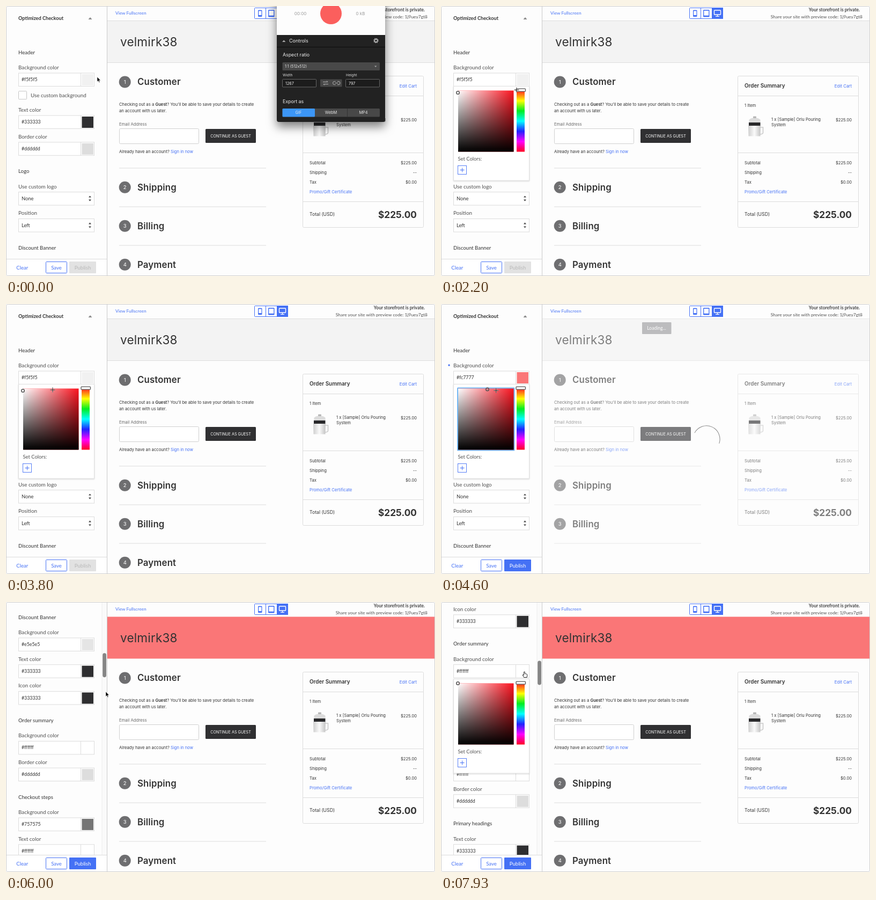
An HTML page for the animation above (8 s loop, 800 by 503 pixels).

```html
<!DOCTYPE html>
<html lang="en">
<head>
<meta charset="utf-8">
<title>Checkout theme editor</title>
<style>
html, body { margin: 0; width: 100%; height: 100%; overflow: hidden; background: #fdfdfd; }
svg { display: block; width: 800px; height: 503px; }
text { white-space: pre; }
.panel { font-family: Lato, sans-serif; }
.page { font-family: Inter, sans-serif; }
</style>
</head>
<body>
<svg id="stage" viewBox="0 0 800 503"></svg>
<script>
const LOOP = 8000;
const BLUE = '#4571f5', INK = '#333', LABEL = '#505050', LINE = '#dcdcdc', PAPER = '#fdfdfd';

// Markup helpers; text is placed by its vertical centre.
const text = (x, y, size, str, fill = INK, attrs = '') =>
  `<text x="${x}" y="${y + size * 0.35}" font-size="${size}" fill="${fill}" ${attrs}>${str}</text>`;
const rect = (x, y, w, h, fill, attrs = '') =>
  `<rect x="${x}" y="${y}" width="${w}" height="${h}" fill="${fill}" ${attrs}/>`;
const path = (d, stroke, attrs = '') => `<path d="${d}" fill="none" stroke="${stroke}" ${attrs}/>`;
const MIDDLE = 'text-anchor="middle"', END = 'text-anchor="end"';

const gradient = (id, stops, vertical) =>
  `<linearGradient id="${id}" x2="${vertical ? 0 : 1}" y2="${vertical ? 1 : 0}">` +
  stops.map(([color, alpha = 1], i) =>
    `<stop offset="${i / (stops.length - 1)}" stop-color="${color}" stop-opacity="${alpha}"/>`).join('') +
  '</linearGradient>';

const defs = `<defs>
  ${gradient('tint', [['#fff'], ['#fff', 0]])}
  ${gradient('shade', [['#000', 0], ['#000']], true)}
  ${gradient('hue', ['#f22', '#ff0', '#0e2', '#0ff', '#22f', '#f0f', '#f02'].map(c => [c]), true)}
  ${gradient('pot', [['#cfcfcf'], ['#fafafa'], ['#c4c4c4']])}
  <filter id="soft" x="-20%" y="-20%" width="140%" height="150%">
    <feDropShadow dx="0" dy="9" stdDeviation="9" flood-opacity=".5"/></filter>
  <filter id="lift"><feDropShadow dx="0" dy="1" stdDeviation="1.2" flood-opacity=".18"/></filter>
</defs>`;

// Sidebar
const SECTIONS = [
  ['Header', [['Background color', '#f5f5f5', true], ['Text color', '#333333'], ['Border color', '#dddddd']]],
  ['Logo', [['Use custom logo', 'None'], ['Position', 'Left']]],
  ['Discount Banner', [['Background color', '#e5e5e5'], ['Text color', '#333333'], ['Icon color', '#333333']]],
  ['Order summary', [['Background color', '#ffffff'], ['Border color', '#dddddd']]],
  ['Checkout steps', [['Background color', '#757575'], ['Text color', '#ffffff'], ['Border color', '#dddddd']]],
  ['Primary headings', [['Text color', '#333333']]],
];

function field(y, value) {
  const box = rect(23.5, y - 12, 141, 24.5, '#fff', `stroke="${LINE}"`);
  if (value[0] !== '#') {
    return box + text(29, y, 9.4, value) +
      `<path d="M154 ${y - 2}l2.5-3.2 2.5 3.2zM154 ${y + 2}l2.5 3.2 2.5-3.2z" fill="#444"/>`;
  }
  const shown = value === '#333333' ? '#2e2e30' : value;
  return box + path(`M139.5 ${y - 12}v24.5`, LINE) +
    text(29, y, 8.8, value, INK, 'class="value"') +
    rect(141.5, y - 10, 21.5, 21, shown, 'class="swatch"');
}

function sidebarContent() {
  let out = text(23, 23, 9.2, 'Optimized Checkout', INK, 'font-weight="700"') +
    '<path d="M153.5 25l3.5-4 3.5 4z" fill="#888"/>';
  let y = 43.5;
  for (const [title, fields] of SECTIONS) {
    y += 43;
    out += text(23, y, 9.6, title);
    y += 0.7;
    for (const [label, value, hasCheckbox] of fields) {
      y += 27.3;
      out += text(23, y, 9.85, label, LABEL);
      y += 22.5;
      out += field(y, value);
      if (hasCheckbox) {
        y += 29.2;
        out += rect(23.5, y - 7.5, 15, 15, '#fff', 'stroke="#c4c4c4" rx="1"') +
          text(46, y + 0.5, 9.85, 'Use custom background', LABEL);
      }
    }
    y -= 0.7;
  }
  return out;
}

// Origin is the vertical centre of the field the picker belongs to.
const picker = `<g id="picker">
  ${rect(23.5, 13, 141, 175.5, '#fff', `stroke="#e0e0e0" filter="url(#lift)"`)}
  ${rect(30, 19, 107.5, 118, '#74b8f4', 'id="focusRing" rx="1.5"')}
  ${['#fb1420', 'url(#tint)', 'url(#shade)'].map(f => rect(32, 21, 103.5, 114, f)).join('')}
  ${rect(141, 21, 15, 114, 'url(#hue)')}
  ${rect(140, 17.7, 17.5, 5, '#fff', 'stroke="#555" stroke-width="1.3" rx="1"')}
  <circle id="knob" r="2.8" fill="none" stroke="#555" stroke-width="1.5"/>
  ${text(31.5, 148.5, 9.4, 'Set Colors:', LABEL)}
  ${rect(31.5, 161, 16, 16, '#fff', `stroke="${BLUE}" stroke-width=".9"`)}
  ${path('M35.5 169h8M39.5 165v8', BLUE)}
</g>`;

const sidebar = `<g class="panel">
  ${rect(0, 0, 189, 503, PAPER)}
  <g id="scroller">${sidebarContent()}
    <circle id="changed" cx="15" cy="114" r="1.7" fill="${BLUE}"/>${picker}</g>
  <g id="scrollbar">${rect(179, 0, 9, 471, '#fafafa')}${path('M179 0V471', '#ececec')}
    ${rect(180.2, 0, 6.8, 45, '#858585', 'id="thumb" rx="3.4"')}</g>
  ${rect(0, 471, 188, 32, '#fff')}${path('M0 471.5H188', LINE)}
  ${text(19.3, 488, 9.6, 'Clear', BLUE)}
  ${rect(74.5, 476.5, 39, 21, '#fff', `stroke="${BLUE}" rx="1"`)}
  ${text(94, 487.5, 9.6, 'Save', BLUE, MIDDLE)}
  ${rect(118, 476, 50, 22, '#e2e2e2', 'id="publish" rx="1"')}
  ${text(143, 487.5, 9.6, 'Publish', '#b8b8b8', MIDDLE + ' id="publishLabel"')}
  ${path('M188.5 0V503', '#cacaca')}
</g>`;

// Preview
const step = (n, y, name) => `<circle cx="221.7" cy="${y}" r="11" fill="#6e6e70"/>` +
  text(221.7, y, 9.5, n, '#fff', MIDDLE) + text(245, y, 16.8, name, INK, 'font-weight="600" letter-spacing=".15"');

const summaryRow = (y, label, value) => text(566, y, 7.7, label) + text(766, y, 7.6, value, INK, END);

const coffeePot = `<path d="M594 226h6.5v10q0 3-7 3" fill="none" stroke="#cacaca" stroke-width="1.6"/>
  <path d="M574.5 217v-5q2-3 8-3.5h5q6 .5 8 3.5v5z" fill="#dcdcdc"/>${rect(582, 205.5, 6, 3.5, '#b8b8b8', 'rx="1"')}
  ${rect(574, 217, 21.5, 6, '#29292b')}
  <path d="M573 223h23l-.5 19.5h-22z" fill="url(#pot)"/>`;

const preview = `<g class="page">
  ${rect(189, 27, 611, 476, PAPER)}
  <g id="shop">
    ${rect(189, 27.5, 611, 78, '#f3f3f3', 'id="banner"')}
    ${path('M189 27.5H800M189 105.5H800', '#dedede', 'id="bannerEdge"')}
    ${text(213, 67.5, 22.5, 'velmirk38', INK, 'letter-spacing=".2"')}
    ${step(1, 141.5, 'Customer')}
    ${text(211, 183.5, 7.7, 'Checking out as a <tspan font-weight="600">Guest</tspan>? You\'ll be able to save your details to create')}
    ${text(211, 195.5, 7.7, 'an account with us later.')}
    ${text(211, 220, 7.7, 'Email Address', '#6a6a6a')}
    ${rect(211.5, 228.5, 148, 28, '#fff', 'stroke="#d0d0d0" rx="2"')}
    ${rect(372, 229, 94, 26, '#303032', 'rx="1.5"')}
    ${text(419, 242, 7.2, 'CONTINUE AS GUEST', '#fff', MIDDLE)}
    ${text(211, 271, 7.7, `Already have an account? <tspan fill="${BLUE}">Sign in now</tspan>`)}
    ${path('M211 302H485M211 374H485M211 446H485', LINE)}
    ${step(2, 337.7, 'Shipping')}${step(3, 409.7, 'Billing')}
    <g id="lastStep">${step(4, 481.7, 'Payment')}</g>
    ${rect(553.5, 130.5, 225, 282, PAPER, `stroke="${LINE}" rx="2"`)}
    ${path('M554 167.5H778M554 273.5H778M554 364.5H778', LINE)}
    ${text(566, 149, 9.9, 'Order Summary', INK, 'font-weight="600"')}
    ${text(766, 149.5, 7.9, 'Edit Cart', BLUE, END)}
    ${text(566, 185.5, 7.7, '1 Item')}
    ${coffeePot}
    ${text(616, 211, 7.7, '1 x [Sample] Orlu Pouring')}${text(616, 221, 7.7, 'System')}
    ${text(766, 212, 7.6, '$225.00', INK, END)}
    ${summaryRow(292, 'Subtotal', '$225.00')}${summaryRow(310.5, 'Shipping', '--')}${summaryRow(328.5, 'Tax', '$0.00')}
    ${text(566, 346.5, 7.7, 'Promo/Gift Certificate', BLUE)}
    ${text(566, 388, 8.7, 'Total (USD)')}
    ${text(766, 388.5, 17.3, '$225.00', INK, END + ' font-weight="700"')}
  </g>
  <g id="loading">
    ${rect(375, 34, 54.5, 22, '#bcbcbe', 'rx="1"')}${text(402, 45, 8.5, 'Loading…', '#fff', MIDDLE + ' class="panel"')}
    ${path('M492 226.4A25 25 0 0 0 497 276', '#888', 'id="spinner"')}
  </g>
</g>`;

const topBar = `<g class="panel">
  ${rect(189, 0, 611, 27, PAPER)}
  ${text(204, 13.5, 8.4, 'View Fullscreen', BLUE)}
  ${rect(463.5, 3.5, 62, 20, '#fff', `stroke="${BLUE}" rx="1"`)}
  ${rect(505, 3, 21, 21, BLUE)}${path('M484.5 3.5v20', BLUE)}
  ${rect(470, 7.5, 7.5, 12.5, BLUE, 'rx="1.3"')}${rect(471.3, 9.3, 5, 7.7, '#fff')}
  ${rect(489, 7, 11.5, 13.5, BLUE, 'rx="1.3"')}${rect(490.4, 8.7, 8.7, 9, '#fff')}
  ${rect(509.5, 8, 12, 8, 'none', 'stroke="#fff" stroke-width="1.4" rx=".8"')}${path('M515.5 16v3M512 19.3h7', '#fff', 'stroke-width="1.3"')}
  ${text(781, 7.3, 8.45, 'Your storefront is private.', '#444', END + ' font-weight="700"')}
  ${text(786, 20.5, 8.45, 'Share your site with preview code: 1j9uey7gt8', LABEL, END)}
</g>`;

// Screen recorder window
const sizeBox = (x, label, value) => text(x, 129, 6.6, label, '#ddd') +
  rect(x - 0.5, 136.5, 63, 14.5, '#1c1c1c', 'stroke="#666" rx="1"') + text(x + 5, 144, 7.2, value, '#eee');

const recorder = `<g id="recorder" class="page">
  <g filter="url(#soft)">${rect(505, -20, 202, 236, '#202020', 'rx="4"')}</g>
  ${rect(505, -20, 202, 74, '#fdfdfd')}
  <circle cx="606" cy="14" r="20" fill="#fb5f5d"/>
  ${text(549, 14.5, 8, '00:00', '#999', MIDDLE)}${text(661, 14.5, 8, '0 kB', '#999', MIDDLE)}
  ${path('M505 76.5H707', '#0c0c0c')}
  <path d="M515 67l3.2-3.6 3.2 3.6z" fill="#aaa"/>
  ${text(528, 65, 9, 'Controls', '#eee')}
  <circle cx="690" cy="64.5" r="2.8" fill="none" stroke="#aaa" stroke-width="2"/>
  <circle cx="690" cy="64.5" r="4.2" fill="none" stroke="#aaa" stroke-width="1.2" stroke-dasharray="1.7 1.6"/>
  ${text(516, 91, 8.8, 'Aspect ratio', '#eee')}
  ${rect(515.5, 105, 181.5, 15, '#494949', 'rx="1.5"')}${text(520, 112.5, 7, '1:1 (512x512)', '#e6e6e6')}
  <path d="M687 111.5l2.2 2.6 2.2-2.6z" fill="#aaa"/>
  ${sizeBox(516, 'Width', '1267')}${sizeBox(634, 'Height', '797')}
  ${rect(586, 136.5, 40.5, 14, '#464646', 'rx="1"')}
  ${path('M591 141.5h9l-2-2M601 145.5h-9l2 2M614.5 140.5h-2a3 3 0 0 0 0 6h2M618 140.5h2a3 3 0 0 1 0 6h-2M613.5 143.5h5.5', '#b5b5b5')}
  ${text(516, 177.5, 8.8, 'Export as', '#eee')}
  ${rect(515.5, 191, 181.5, 15.5, '#484848', 'rx="1.5"')}${rect(515.5, 191, 60.5, 15.5, '#3c96f6', 'rx="1.5"')}
  ${path('M636.5 191v15.5', '#333')}
  ${['GIF', 'WebM', 'MP4'].map((s, i) => text(545.5 + i * 60.5, 198.8, 7.4, s, '#e8e8e8', MIDDLE)).join('')}
</g>`;

const cross = 'M-4.5 0h9M0-4.5v9';
const cursors = `<g id="cursor">
  <path id="arrow" d="M0 0V9.2L2.1 7.3 3.6 10.6 5 10 3.6 6.8H6.4Z" fill="#000" stroke="#fff" stroke-width=".6"/>
  <path id="hand" d="M-1 .8a1 1 0 0 1 2 0V3.5l3.4.8q1 .4.9 1.5l-.6 4.7H-.8L-3.4 6q.6-1.2 2.4.3Z" fill="#fff" stroke="#111" stroke-width=".9"/>
  <g id="cross">${path(cross, '#fff', 'stroke-width="2" opacity=".6"')}${path(cross, '#222')}</g>
</g>`;

const stage = document.getElementById('stage');
stage.innerHTML = defs + rect(0, 0, 800, 503, PAPER) + preview + topBar + sidebar +
  rect(0.5, 0.5, 799, 502, 'none', 'stroke="#cfcfcf" rx="3"') + recorder + cursors;

const $ = id => document.getElementById(id);
const set = (el, attrs) => { for (const k in attrs) el.setAttribute(k, attrs[k]); };
const show = (id, on) => set($(id), { visibility: on ? 'visible' : 'hidden' });
const ramp = (t, from, to) => Math.min(1, Math.max(0, (t - from) / (to - from)));
const smooth = p => p * p * (3 - 2 * p);

// Keys are [time, ...values].
function track(keys, t, ease = p => p) {
  const next = keys.findIndex(key => key[0] > t);
  if (next < 1) return keys[next ? keys.length - 1 : 0].slice(1);
  const a = keys[next - 1], b = keys[next];
  const p = ease(ramp(t, a[0], b[0]));
  return a.slice(1).map((v, i) => v + (b[i + 1] - v) * p);
}

const POINTER = [[0, 170, 132], [200, 170, 132], [850, 154, 133], [1700, 154, 133], [2500, 135, 167],
  [3000, 135, 167], [3700, 87, 160], [4500, 87, 160], [4900, 186, 167], [7000, 186, 167], [7600, 155.5, 130]];
const SCROLL = [[4950, 0], [5270, 70], [6000, 422], [6450, 540], [6850, 565]];
const OPEN_FIRST = 1450, PICK = 4400, LOAD = 4470, LOADED = 5550, OPEN_SECOND = 7870;

const firstValue = stage.querySelector('.value'), firstSwatch = stage.querySelector('.swatch');

function draw(t) {
  const picked = t >= PICK, loaded = t >= LOADED, loading = t >= LOAD && !loaded;
  const second = t > 6300;

  const [x, y] = track(POINTER, t, smooth);
  set($('cursor'), { transform: `translate(${x} ${y})` });
  const kind = x > 165 ? 'arrow' : y < 150 ? 'hand' : 'cross';
  for (const id of ['arrow', 'hand', 'cross']) show(id, id === kind);

  const [scroll] = track(SCROLL, t);
  set($('scroller'), { transform: `translate(0 ${-scroll})` });
  show('scrollbar', scroll > 0);
  set($('thumb'), { y: 53 + scroll * 0.1 });

  const open = second ? t >= OPEN_SECOND : t >= OPEN_FIRST;
  set($('picker'), { transform: `translate(0 ${second ? 695.5 : 136.5})`, display: open ? 'inline' : 'none' });
  set($('focusRing'), { opacity: picked && !second ? 1 : 0 });
  set($('knob'), picked && !second ? { cx: 86.5, cy: 22.5 } : { cx: 31.5, cy: 21 + (second ? 0 : 4) });

  firstValue.textContent = picked ? '#fc7777' : '#f5f5f5';
  set(firstSwatch, { fill: picked ? '#fa7677' : '#f1f1f1' });
  show('changed', picked);
  set($('publish'), { fill: picked ? BLUE : '#e2e2e2' });
  set($('publishLabel'), { fill: picked ? '#fff' : '#b8b8b8' });

  const fade = loaded ? 1 - ramp(t, LOADED, LOADED + 150) : ramp(t, LOAD, LOAD + 300);
  set($('shop'), { opacity: 1 - 0.86 * fade });
  set($('banner'), { fill: loaded ? '#fa7677' : '#f3f3f3' });
  show('bannerEdge', !loaded);
  show('loading', loading);
  show('lastStep', !loading);
  set($('spinner'), { transform: `rotate(${(t - 5270) * 0.36} 495.5 251)` });

  const gone = ramp(t, 70, 270);
  set($('recorder'), { opacity: 1 - gone, display: gone < 1 ? 'inline' : 'none' });
}

const start = performance.now();
function tick() {
  draw((performance.now() - start) % LOOP);
  requestAnimationFrame(tick);
}
tick();
</script>
</body>
</html>
```
